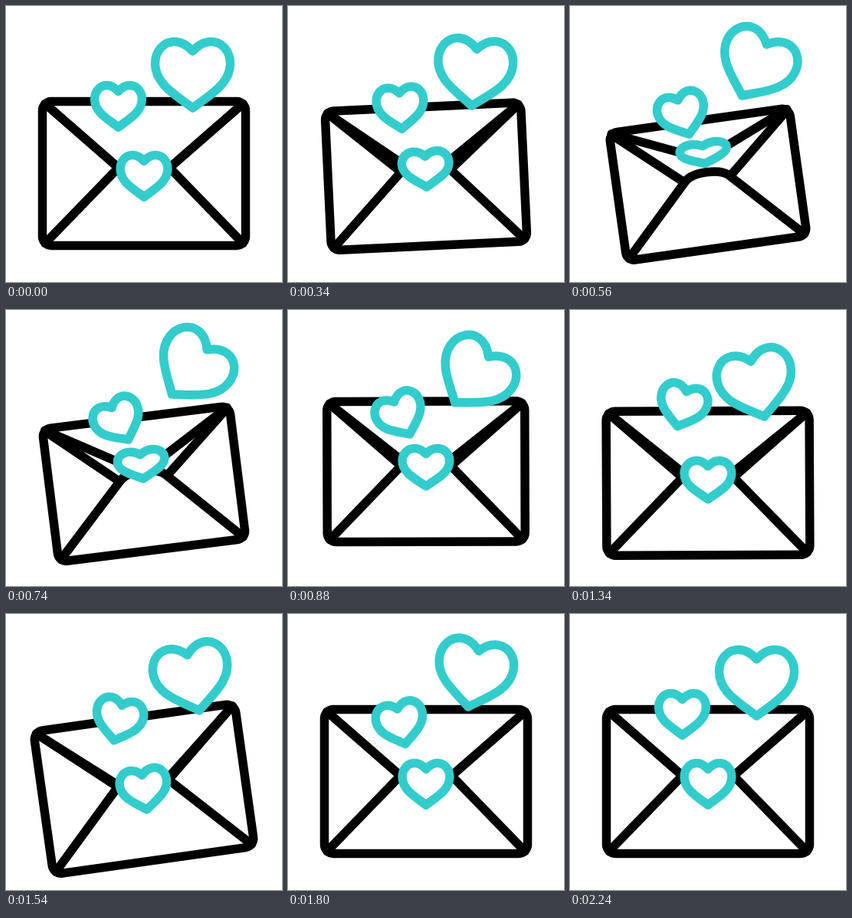
Write an HTML page that moves like this. It is 360 px wide and 360 px high and loops after 2.4 s.

```html
<!DOCTYPE html>
<html lang="en">
<head>
<meta charset="utf-8">
<title>Love letter</title>
<style>
  html, body { margin: 0; width: 100%; height: 100%; overflow: hidden; background: #fff; }
  svg { display: block; width: 100vw; height: 100vh; }
  path, rect {
    fill: none; stroke: #000; stroke-width: 11.5;
    stroke-linejoin: round; stroke-linecap: round;
    vector-effect: non-scaling-stroke;
  }
  .heart { fill: #fff; stroke: #33cccc; }

  /* Every track shares one clock; each segment eases in and out. */
  .env, .size, .flap, .seal, .fold, .small, .large {
    transform-origin: 0 0;
    animation: 2400ms cubic-bezier(.35, 0, .65, 1) infinite;
  }
  .env { animation-name: env-move, env-turn; }
  .size { animation-name: env-size; }
  .flap, .fold { animation-name: fold; }
  .seal { animation-name: seal-move; }
  .small { animation-name: small-move, small-turn; }
  .large { animation-name: large-move, large-turn; }

  @keyframes env-move {
    0%, 8.33% { translate: 180px 218.5px; }
    26.67% { translate: 180px 234px; }
    38.33% { translate: 180px 209.5px; }
    47.5% { translate: 180px 211.5px; }
    60% { translate: 180px 230.5px; }
    75%, 100% { translate: 180px 218.5px; }
  }
  @keyframes env-turn {
    0%, 8.33% { rotate: 0deg; }
    23.33%, 28.33% { rotate: -8deg; }
    48.33% { rotate: 12.8deg; }
    61.25%, 64.2% { rotate: -8deg; }
    75%, 100% { rotate: 0deg; }
  }
  @keyframes env-size {
    0%, 8.33% { scale: 1; }
    23.33% { scale: .895; }
    43.33%, 100% { scale: 1; }
  }
  @keyframes fold {
    0%, 8.33% { scale: 1 1; }
    25% { scale: 1 .48; }
    37.5% { scale: 1 .91; }
    48.33% { scale: 1 .9; }
    73.33%, 100% { scale: 1 1; }
  }
  @keyframes seal-move {
    0%, 8.33% { translate: 0 3.5px; }
    25% { translate: 0 -42px; }
    37.5% { translate: 0 -5px; }
    48.33% { translate: 0 -6px; }
    73.33%, 100% { translate: 0 3.5px; }
  }
  @keyframes small-move {
    0%, 8.33% { translate: 146.5px 131px; }
    30.83% { translate: 147px 145px; }
    47.5% { translate: 147px 118.5px; }
    71.67% { translate: 147px 144px; }
    92.5%, 100% { translate: 146.5px 131px; }
  }
  @keyframes small-turn {
    0%, 8.33% { rotate: 0deg; }
    33.33% { rotate: -28deg; }
    56.67%, 61.67% { rotate: 15deg; }
    75.83% { rotate: -13deg; }
    92.5%, 100% { rotate: 0deg; }
  }
  @keyframes large-move {
    0%, 8.33% { translate: 243.5px 90px; }
    29.17% { translate: 243px 75.5px; }
    47.5% { translate: 243.5px 104.5px; }
    71.67% { translate: 243px 78px; }
    92.5%, 100% { translate: 243.5px 90px; }
  }
  @keyframes large-turn {
    0%, 8.33% { rotate: 0deg; }
    33.33% { rotate: 39deg; }
    56.67%, 61.67% { rotate: -14deg; }
    75.83% { rotate: 11deg; }
    92.5%, 100% { rotate: 0deg; }
  }
</style>
</head>
<body>
<svg viewBox="0 0 360 360">
  <defs>
    <path id="heart" class="heart" d="M0-31C-8-40-17-43.5-24-43.5C-38-43.5-49-31-49-15C-49 12-22 26 0 43C22 26 49 12 49-15C49-31 38-43.5 24-43.5C17-43.5 8-40 0-31Z"/>
  </defs>
  <g class="env">
    <g class="size">
      <rect x="-132.5" y="-94" width="265" height="188" rx="12"/>
      <path d="M-129 91L-32-9C-20-21 20-21 32-9L129 91M-129-91L-34-8M129-91L34-8"/>
      <g transform="translate(0 -94)">
        <path class="flap" d="M-129 3L-20 98Q0 112 20 98L129 3"/>
      </g>
    </g>
    <g class="seal"><g class="fold"><use href="#heart" transform="scale(.63)"/></g></g>
  </g>
  <g class="small"><use href="#heart" transform="scale(.63)"/></g>
  <g class="large"><use href="#heart"/></g>
</svg>
</body>
</html>
```
